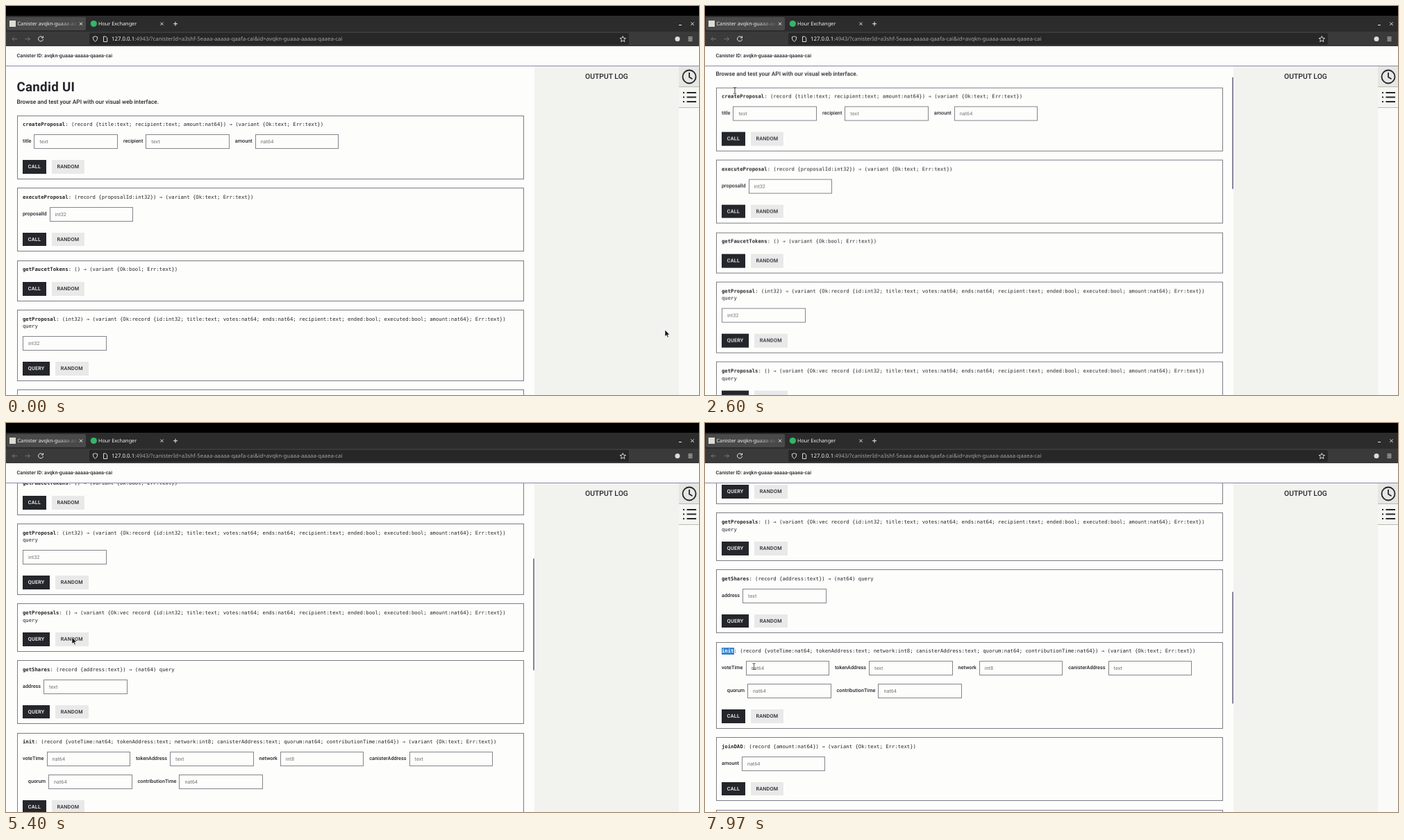
An HTML page for the animation above (8000 ms loop, 998 by 561 pixels).

```html
<!DOCTYPE html>
<html lang="en">
<head>
<meta charset="utf-8">
<title>Candid UI</title>
<style>
  html, body { margin: 0; width: 100%; height: 100%; overflow: hidden; }
  body { position: relative; background: #fdfdfc; color: #25262b; font: 500 7.28px/10.9px Roboto, sans-serif; text-rendering: geometricPrecision; }
  div, svg { position: absolute; box-sizing: border-box; white-space: nowrap; }
  .chrome { left: 0; top: 0; width: 998px; height: 58px; background: #3a3a3b; color: #f2f2f2; font: 400 7.3px/12px "Noto Sans", sans-serif; }
  .strip { top: 0; width: 998px; height: 37px; background: #2c2c2d; border-top: 14px solid #000; }
  .tab { left: 1px; top: 16px; width: 114px; height: 19px; border-radius: 2px; background: #49494a; }
  .url { left: 120px; top: 39px; width: 777px; height: 17px; border-radius: 2px; background: #272728; }
  .address { left: 152px; top: 41.5px; font-size: 7.83px; color: #a5a5a5; }
  .address b { font-weight: 400; color: #f6f6f6; }
  .fade { width: 88px; overflow: hidden; -webkit-mask: linear-gradient(90deg, #000 65%, transparent); mask: linear-gradient(90deg, #000 65%, transparent); }
  .header { top: 58px; width: 998px; height: 29px; border-bottom: 1px solid #8989a8; }
  .pane { top: 87px; width: 761px; height: 474px; overflow: hidden; }
  .page { top: -87px; width: 761px; height: 1080px; }
  .title { left: 15.5px; top: 106px; font-size: 18.7px; line-height: 22px; font-weight: 700; letter-spacing: .3px; }
  .intro { left: 15.5px; top: 134px; font-size: 8.32px; }
  .card { left: 15.5px; width: 730px; border: 1px solid #7b7b85; }
  .sig { left: 7.5px; top: 7.5px; font: 400 7.28px/10.9px "DejaVu Sans Mono", monospace; }
  .sig b { position: relative; }
  .row { display: flex; align-items: center; height: 21px; }
  .row span { margin-right: 4px; }
  .row i { flex: none; box-sizing: border-box; width: 120.5px; height: 21px; margin-right: 8px; padding-left: 7px; border: 1px solid #85858c; font-style: normal; font-weight: 400; line-height: 19px; color: #757575; }
  .keys { left: 7.5px; display: flex; gap: 7.8px; }
  .keys span { padding: 0 7.8px; line-height: 19.5px; letter-spacing: .2px; background: #e9e9e9; }
  .keys span:first-child { background: #25262b; color: #fff; }
  .select { inset: -.5px 0; background: #3584d0; color: #fff; }
  .bar { left: 758.5px; top: 87.8px; width: 2px; height: 161.5px; background: #8686a0; }
  .log { left: 761px; top: 87px; width: 208px; height: 474px; background: #f2f2ef; text-align: center; font-size: 10.4px; line-height: 29px; }
  .side { left: 969px; top: 87px; width: 29px; height: 474px; background: #fafaf8; }
  .side div { width: 29px; height: 30px; background: #e6e6e3; border-bottom: 1px solid #bcbcb0; }
  .side div + div { top: 30px; background: #f5f5f2; }
  svg { left: 0; top: 0; overflow: visible; }
</style>
</head>
<body>
<div class="chrome">
  <div class="strip"></div>
  <div class="tab"></div>
  <div class="url"></div>
  <div class="fade" style="left:16.5px;top:19.5px">Canister avqkn-guaaa-aaaaa</div>
  <div style="left:133px;top:19.5px">Hour Exchanger</div>
  <div class="address"><b>127.0.0.1</b>:4943/?canisterId=a3shf-5eaaa-aaaaa-qaafa-cai&amp;id=avqkn-guaaa-aaaaa-qaaea-cai</div>
</div>
<div class="header"><div style="left:15.5px;top:9px">Canister ID: avqkn-guaaa-aaaaa-qaaea-cai</div></div>
<div class="pane">
  <div class="page" id="page">
    <div class="title">Candid UI</div>
    <div class="intro">Browse and test your API with our visual web interface.</div>
  </div>
</div>
<div class="log">OUTPUT LOG</div>
<div class="side"><div></div><div></div></div>
<div class="bar" id="bar"></div>

<svg width="998" height="561" fill="none" stroke="#eee">
  <rect x="5" y="21" width="9" height="9" fill="#dcdcd4" stroke="none"/>
  <circle cx="126.3" cy="25.5" r="4.6" fill="#35b56a" stroke="none"/>
  <path d="M106 23.7l4 4m0-4l-4 4M222.5 23.7l4 4m0-4l-4 4M244 22.7v6m-3-3h6M969 27.5h4M986.3 23.5l4.4 4.4m0-4.4l-4.4 4.4"/>
  <path stroke="#747474" d="M16 47.5H9m3-3l-3 3 3 3M27.5 47.5h7m-3-3l3 3-3 3"/>
  <path d="M53 45.5a3.5 3.5 0 1 0 .5 2.500M53.5 43.5v2.500h-2.500"/>
  <path d="M128.5 43.7l3.3 1.2q0 4.8-3.3 6.5-3.3-1.7-3.3-6.5zM140.5 44h3.2l2 2v5.5h-5.2zM888.3 43.5l1.2 2.7 3 .3-2.300 2 .7 3-2.600-1.600-2.600 1.600.7-3-2.300-2 3-.3z" stroke-width=".9"/>
  <circle cx="967" cy="47.5" r="3.5" fill="#ddd" stroke="none"/>
  <path d="M982.5 45h6m-6 2.500h6m-6 2.500h6"/>
  <g stroke="#25262b" stroke-width="1.8">
    <circle cx="984" cy="102" r="9.5"/>
    <path d="M984 96v6.5l4.5 2.7"/>
    <path d="M980.5 125h13.5m-13.5 6.5h13.5m-13.5 6.5h13.5M975 125h2m-2 6.5h2m-2 6.5h2"/>
  </g>
  <g id="cursor">
    <path id="arrow" d="M0 0v9.6l2.2-2 1.6 3.4 1.5-.7-1.5-3.3h2.9z" fill="#111" stroke="#fff" stroke-width=".6"/>
    <path id="beam" d="M-2-4.5q2 0 2 1v7q0 1-2 1M2-4.5q-2 0-2 1m0 7q0 1 2 1" stroke="#333" stroke-width=".9"/>
  </g>
</svg>

<script>
const LOOP = 8000;
const $ = id => document.getElementById(id);
const result = ' → (variant {Ok:text; Err:text})';
const proposal = 'record {id:int32; title:text; votes:nat64; ends:nat64; recipient:text; ended:bool; executed:bool; amount:nat64}; Err:text})';

// name, signature, rows of "label:type" fields, is a query, wraps to a second line
const methods = [
  ['createProposal', '(record {title:text; recipient:text; amount:nat64})' + result, ['title:text recipient:text amount:nat64']],
  ['executeProposal', '(record {proposalId:int32})' + result, ['proposalId:int32']],
  ['getFaucetTokens', '() → (variant {Ok:bool; Err:text})', []],
  ['getProposal', '(int32) → (variant {Ok:' + proposal, [':int32'], true, true],
  ['getProposals', '() → (variant {Ok:vec ' + proposal, [], true, true],
  ['getShares', '(record {address:text}) → (nat64)', ['address:text'], true],
  ['init', '(record {voteTime:nat64; tokenAddress:text; network:int8; canisterAddress:text; quorum:nat64; contributionTime:nat64})' + result,
    ['voteTime:nat64 tokenAddress:text network:int8 canisterAddress:text', 'quorum:nat64 contributionTime:nat64']],
  ['joinDAO', '(record {amount:nat64})' + result, ['amount:nat64']],
  ['leaveDAO', '()' + result, []]
];

function field(spec) {
  const [label, type] = spec.split(':');
  return (label && `<span>${label}</span>`) + `<i>${type}</i>`;
}

let cardTop = 157.5;
for (const [name, type, rows, query, wraps] of methods) {
  const extra = wraps ? 10.7 : 0;
  const keysY = 41 + extra + 33 * rows.length;
  const mark = name === 'init' ? '<div class="select" id="select">init</div>' : '';
  const suffix = query ? (wraps ? '<br>' : ' ') + 'query' : '';
  const fields = rows.map((row, i) =>
    `<div class="row" style="left:${7.5 + 7.8 * i}px;top:${26.5 + extra + 33 * i}px">${row.split(' ').map(field).join('')}</div>`);
  const card = document.createElement('div');
  card.className = 'card';
  card.style.cssText = `top:${cardTop}px;height:${keysY + 18}px`;
  card.innerHTML = `<div class="sig"><b>${name}${mark}</b>: ${type}${suffix}</div>${fields.join('')}
    <div class="keys" style="top:${keysY - 10.5}px"><span>${query ? 'QUERY' : 'CALL'}</span><span>RANDOM</span></div>`;
  $('page').append(card);
  cardTop += keysY + 30.5;
}

function play(id, steps, pose, easing = 'linear') {
  const end = [LOOP, ...steps[steps.length - 1].slice(1)];
  $(id).animate([...steps, end].map(([t, ...v]) => ({ offset: t / LOOP, easing, ...pose(...v) })),
    { duration: LOOP, iterations: Infinity });
}

// Flips visibility at each of the given times.
function toggle(id, times, first = 0) {
  play(id, [0, ...times].map((t, i) => [t, (first + i) % 2]), opacity => ({ opacity }), 'steps(1, end)');
}

const scroll = [[0, 0], [2480, 0], [2600, 40.5], [2950, 0], [4430, 0], [5400, 293], [6270, 346], [6880, 424]];
const path = [
  [0, 949, 467], [400, 540, 575], [1300, 538, 575], [1330, 538, 559.5], [2130, 43, 122], [3000, 43, 122],
  [3800, 85, 515], [4200, 90, 300], [4500, 90, 300], [5400, 95, 309], [6270, 56, 362],
  [6900, 60, 455], [7070, 60, 455], [7400, 33, 329], [7970, 70.5, 351]
];
const cursorFlips = [2130, 3000, 4150, 4700, 7330];

play('page', scroll, y => ({ transform: `translateY(${-y}px)` }));
play('bar', scroll, y => ({ transform: `translateY(${y * .367}px)` }));
play('cursor', path, (x, y) => ({ transform: `translate(${x}px, ${y}px)` }), 'ease-in-out');
toggle('beam', cursorFlips);
toggle('arrow', cursorFlips, 1);
toggle('bar', [2480]);
toggle('select', [7500]);
</script>
</body>
</html>
```
